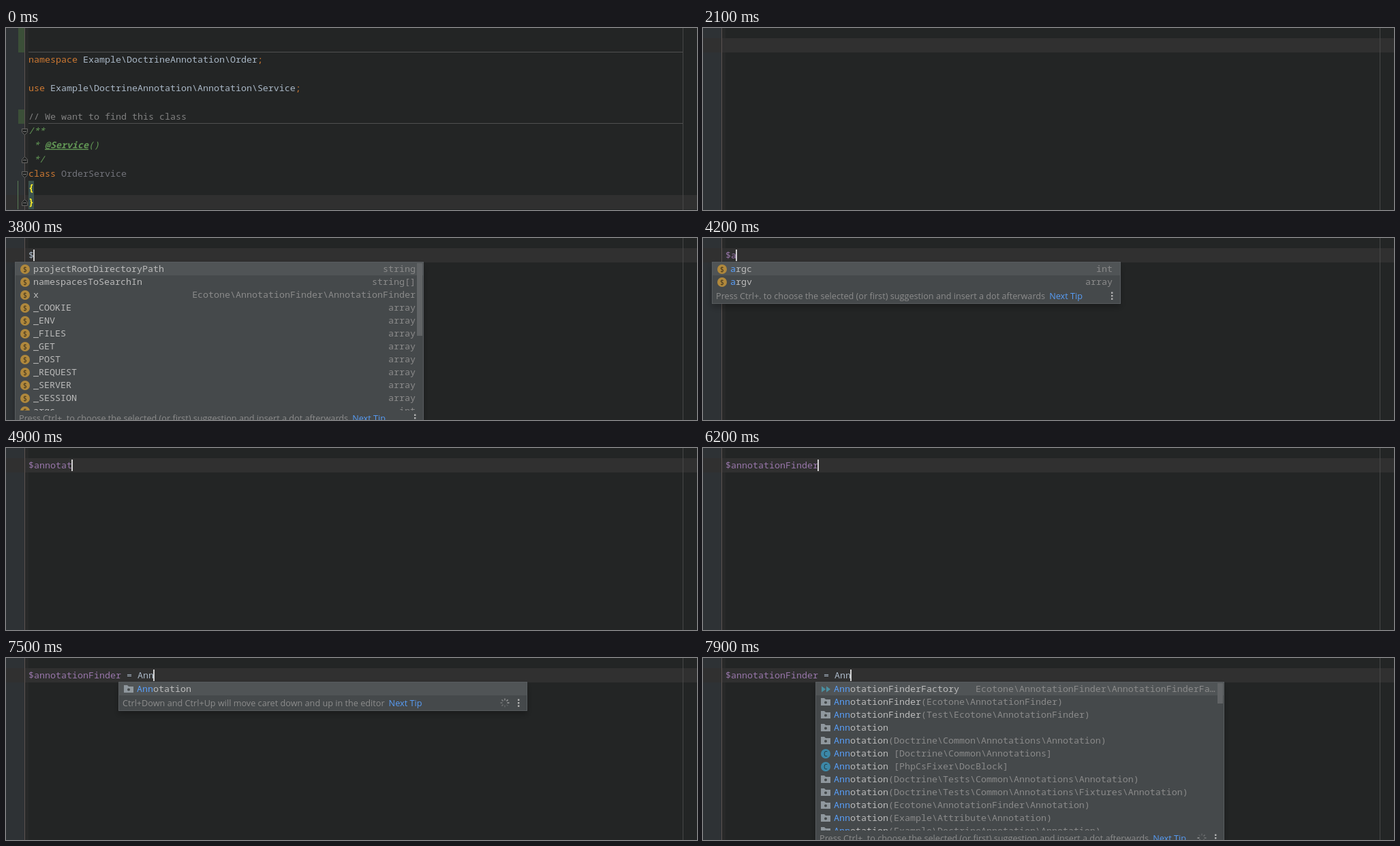
An HTML page for the animation above (8 s loop, 1014x268 px).

```html
<!DOCTYPE html>
<html lang="en">
<head>
<meta charset="utf-8">
<title>Code completion</title>
<style>
  html, body { margin: 0; width: 100%; height: 100%; overflow: hidden; background: #232525; }
  svg { display: block; }
  text { font: 13.334px "Noto Sans Mono", "DejaVu Sans Mono", monospace; white-space: pre; fill: #a9b7c6; }
  .tip { font: 12.68px "Open Sans", "Noto Sans", sans-serif; fill: #8c8c8c; }
  .key { fill: #cc7832; }
  .doc { fill: #629755; font-style: italic; }
  .tag { font-weight: bold; text-decoration: underline; }
  .note { fill: #808080; }
  .unused { fill: #72737a; }
  .brace { fill: #ffef28; font-weight: bold; }
  .var { fill: #9876aa; }
  .item { fill: #bbbbbb; }
  .dim { fill: #8a8a8a; }
  .hit { fill: #589df6; }
</style>
</head>
<body>
<svg id="stage" width="1014" height="268">
  <defs>
    <filter id="shadow" x="-10%" y="-40%" width="120%" height="200%">
      <feDropShadow dx="0" dy="5" stdDeviation="5" flood-color="#000" flood-opacity=".25"/>
    </filter>
    <clipPath id="rows"><rect width="1014" height="254"/></clipPath>
  </defs>
  <g id="view"></g>
</svg>
<script>
const LOOP = 8000, LEFT = 33, CHAR = 8, LINE = 21, ROW = 19, TOP = 36;
const LINE_TEXT = '$annotationFinder = Ann';
const VAR_LENGTH = 17;

// [time, number of typed characters]
const TYPING = [
  [0, 0], [3800, 1], [4100, 2], [4300, 3], [4400, 4], [4600, 5], [4700, 6], [4800, 7],
  [4900, 8], [5000, 9], [5100, 10], [5300, 11], [5700, 12], [5800, 13], [5900, 15],
  [6100, 16], [6200, 17], [6300, 18], [6400, 19], [6500, 20], [7100, 21], [7200, 22], [7500, 23]
];

const DOT_TIP = 'Press Ctrl+. to choose the selected (or first) suggestion and insert a dot afterwards';
const CARET_TIP = 'Ctrl+Down and Ctrl+Up will move caret down and up in the editor';

// Rows are [icon, name, detail]
const variable = (name, type) => ['variable', name, type];
const folder = (name, detail = '') => ['folder', name, detail];
const ARGS = [variable('argc', 'int'), variable('argv', 'array')];
const GLOBALS = ['COOKIE', 'ENV', 'FILES', 'GET', 'POST', 'REQUEST', 'SERVER', 'SESSION'];
const VARIABLES = [
  variable('projectRootDirectoryPath', 'string'),
  variable('namespacesToSearchIn', 'string[]'),
  variable('x', 'Ecotone\\AnnotationFinder\\AnnotationFinder'),
  ...GLOBALS.map(name => variable('_' + name, 'array')),
  ARGS[0]
];
const CLASSES = [
  ['factory', 'AnnotationFinderFactory', '   Ecotone\\AnnotationFinder\\AnnotationFinderFa…'],
  folder('AnnotationFinder', '(Ecotone\\AnnotationFinder)'),
  folder('AnnotationFinder', '(Test\\Ecotone\\AnnotationFinder)'),
  folder('Annotation'),
  folder('Annotation', '(Doctrine\\Common\\Annotations\\Annotation)'),
  ['class', 'Annotation', ' [Doctrine\\Common\\Annotations]'],
  ['class', 'Annotation', ' [PhpCsFixer\\DocBlock]'],
  folder('Annotation', '(Doctrine\\Tests\\Common\\Annotations\\Annotation)'),
  folder('Annotation', '(Doctrine\\Tests\\Common\\Annotations\\Fixtures\\Annotation)'),
  folder('Annotation', '(Ecotone\\AnnotationFinder\\Annotation)'),
  folder('Annotation', '(Example\\Attribute\\Annotation)'),
  folder('Annotation', '(Example\\DoctrineAnnotation\\Annotation)')
];

const rect = (x, y, w, h, fill) => `<rect x="${x}" y="${y}" width="${w}" height="${h}" fill="${fill}"/>`;
const span = (cls, s) => `<tspan class="${cls}">${s}</tspan>`;
const text = (x, y, s, cls = '', extra = '') => `<text x="${x}" y="${y}" class="${cls}" ${extra}>${s}</text>`;

const badge = (letter, fill, ink) => (x, y) => `<circle cx="${x}" cy="${y}" r="7" fill="${fill}"/>` +
  text(x, y + 3.5, letter, '', `text-anchor="middle" style="font-size:10px;fill:${ink}"`);
const ICONS = {
  variable: badge('$', '#b0883c', '#40351f'),
  class: badge('C', '#3c88a8', '#243b42'),
  folder: (x, y) => `<path d="M${x - 7} ${y - 6}h5l2 2h7v9h-14z" fill="#8f979d"/>
    <circle cx="${x}" cy="${y + .5}" r="2" fill="#45494b"/>`,
  factory: (x, y) => `<path d="M${x - 6} ${y - 4.5}l6 4.5l-6 4.5zm7 0l6 4.5l-6 4.5z" fill="#4a8fa0"/>`
};

function editor(caretLine, marks = '') {
  return rect(0, 0, 1014, 268, '#232525') + rect(0, 0, 27, 268, '#2e3235') +
    rect(28, 0, 5, 268, '#282929') + rect(0, caretLine, 1014, LINE, '#303030') + marks +
    rect(27, 0, 1, 268, '#5b5350') + rect(993, 0, 1, 268, '#484848');
}

function foldMark(y, dir) {
  return `<path d="M23.5 ${y - 4 * dir}h8v${5 * dir}l-4 ${4 * dir}l-4 ${-4 * dir}z" fill="#232525" stroke="#666563"/>` +
    rect(25, y - .5, 5, 1, '#777');
}

function classFile() {
  const semi = span('key', ';');
  const lines = {
    36: span('key', 'namespace') + ' Example\\DoctrineAnnotation\\Order' + semi,
    78: span('key', 'use') + ' Example\\DoctrineAnnotation\\Annotation\\Service' + semi,
    120: span('note', '// We want to find this class'),
    141: span('doc', '/**'),
    162: span('doc', ' * ') + span('doc tag', '@Service') + span('doc', '()'),
    183: span('doc', ' */'),
    204: span('key', 'class') + span('unused', ' OrderService'),
    225: span('brace', '{'),
    246: span('brace', '}')
  };
  const marks = rect(18, 0, 9, 36, '#3b4f38') + rect(18, 120, 9, LINE, '#3b4f38') +
    rect(17, 225, 1, 42, '#587a55') + rect(LEFT, 35, 960, 1, '#505050') +
    rect(LEFT, 140, 960, 1, '#505050') + rect(LEFT, 225, CHAR, 42, '#3b514d');
  return editor(246, marks) +
    foldMark(152.5, 1) + foldMark(194.5, -1) + foldMark(215.5, 1) + foldMark(257.5, -1) +
    Object.entries(lines).map(([y, s]) => text(LEFT, +y + 15, s)).join('');
}

function spinner(x, y, t) {
  const phase = Math.floor(t / 100);
  let out = '';
  for (let i = 0; i < 8; i++) {
    const glow = .15 + .6 * ((i - phase + 800) % 8) / 7;
    out += `<path d="M0 -3.5v-3" stroke="#bbb" stroke-width="1.5" opacity="${glow}"
      transform="translate(${x} ${y}) rotate(${i * 45})"/>`;
  }
  return out;
}

function popup({ x, rows, hits, tip, bar, busy }, t) {
  const end = TOP + rows.length * ROW - (rows.length > 11 ? 10 : 0);
  const list = rows.map(([icon, name, detail], i) => {
    const mid = TOP + i * ROW + 10;
    const label = span('hit', name.slice(0, hits)) + span('item', name.slice(hits));
    const isVar = icon === 'variable';
    return ICONS[icon](x + 15, mid) +
      text(x + 27, mid + 4, label + (isVar ? '' : span('dim', detail))) +
      (isVar ? text(x + 588, mid + 4, detail, 'dim', 'text-anchor="end"') : '');
  }).join('');
  const dots = [-4.5, 0, 4.5].map(d => rect(x + 586, end + 10 + d, 2.4, 2.4, '#b5b5b5')).join('');
  return `<g filter="url(#shadow)">${rect(x, 35, 600, end - 12, '#595c5e')}</g>` +
    rect(x + 1, TOP, 598, end - 14, '#45494b') + rect(x + 1, TOP, 598, ROW, '#505456') +
    `<g clip-path="url(#rows)">${list}</g>` +
    (bar ? rect(x + 590, 37, 8, bar, '#616466') : '') +
    text(x + 6, end + 16, tip + `<tspan class="hit" dx="6">Next Tip</tspan>`, 'tip') +
    dots + (busy ? spinner(x + 567, end + 11, t) : '');
}

function completion(t) {
  if (t >= 3800 && t < 4200) return { x: 13, rows: VARIABLES, hits: 0, tip: DOT_TIP, bar: 107 };
  if (t >= 4200 && t < 4300) return { x: 13, rows: ARGS, hits: 1, tip: DOT_TIP };
  if (t >= 7300 && t < 7600) {
    return { x: 165, rows: [folder('Annotation')], hits: t < 7500 ? 2 : 3, tip: CARET_TIP, busy: true };
  }
  if (t >= 7600) return { x: 165, rows: CLASSES, hits: 3, tip: DOT_TIP, bar: 30, busy: true };
}

function caretShown(t) {
  const blinks = [500, 1000, 1500, 2100, 2600, 3100, 3800].filter(b => t >= b).length;
  return blinks % 2 === 1;
}

function typingView(t) {
  const count = TYPING.filter(([at]) => t >= at).pop()[1];
  const typed = LINE_TEXT.slice(0, count);
  const line = span(count > 1 ? 'var' : '', typed.slice(0, VAR_LENGTH)) + typed.slice(VAR_LENGTH);
  const caretX = count ? LEFT - 1 + CHAR * count : LEFT;
  const list = completion(t);
  return editor(15) + text(LEFT, 30, line) +
    (caretShown(t) ? rect(caretX, 17, 2, 17, '#d0d0d0') : '') +
    (list ? popup(list, t) : '');
}

const view = document.getElementById('view');
let shown = -1;
function draw() {
  const t = Math.floor(performance.now() % LOOP / 100) * 100;
  if (t !== shown) {
    view.innerHTML = t < 500 ? classFile() : typingView(t);
    shown = t;
  }
  requestAnimationFrame(draw);
}
draw();
</script>
</body>
</html>
```
